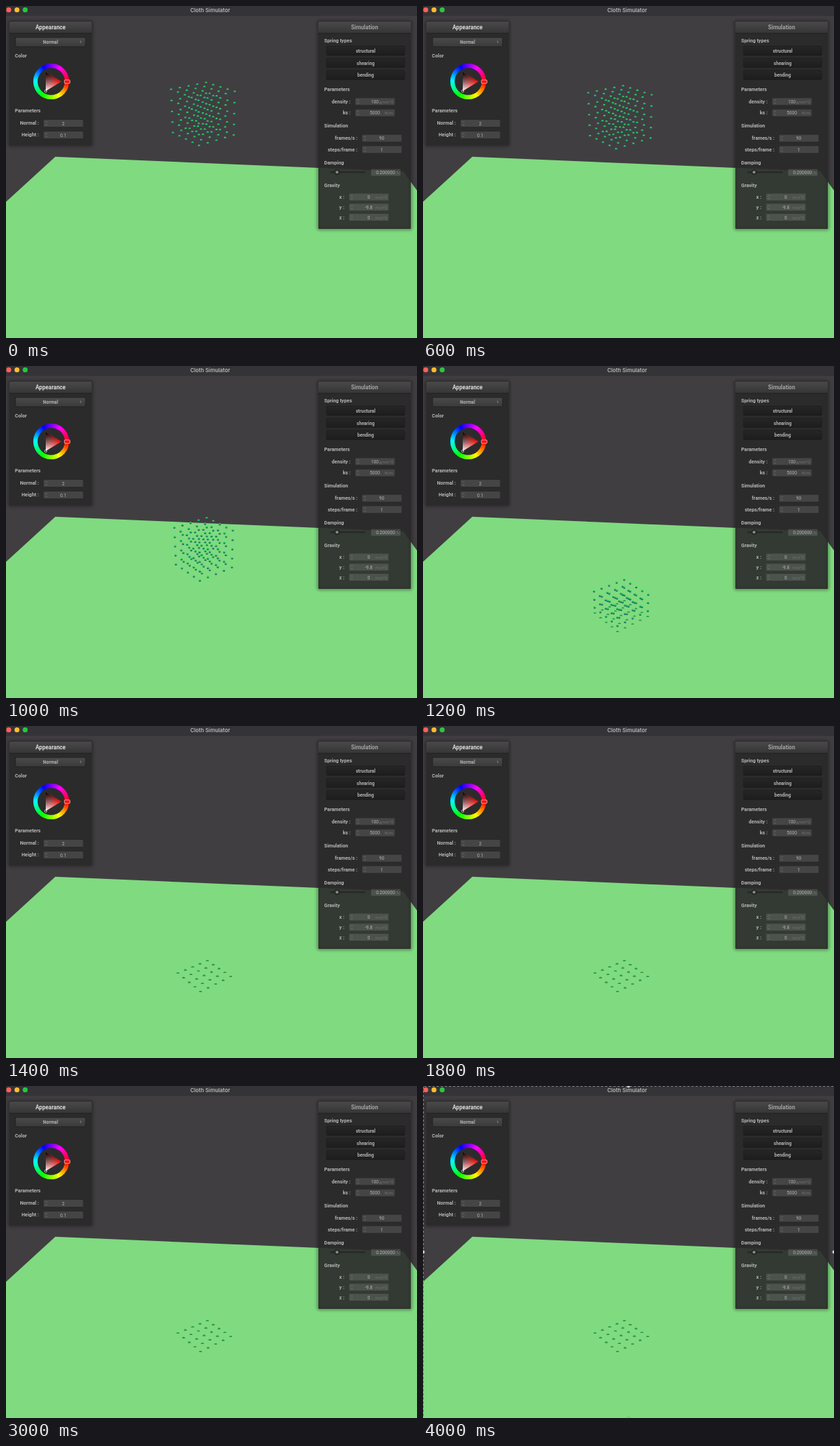
These frames come from a looping animation (600 by 484 pixels, 4800 ms). An HTML page:

```html
<!DOCTYPE html>
<html lang="en">
<head>
<meta charset="utf-8">
<title>Cloth Simulator</title>
<style>
html, body { margin: 0; width: 100%; height: 100%; overflow: hidden; background: #413e41; }
svg { display: block; width: 600px; height: 484px; }
text { font: 6.6px Roboto, sans-serif; fill: #b6b6b6; }
.bar { font: 600 7.8px Inter, sans-serif; fill: #b9b8b9; }
.title { font-size: 8.2px; font-weight: 700; }
.label { font-size: 7.2px; font-weight: 700; }
.button { font-weight: 700; }
.unit { font-size: 6.2px; fill: #737373; }
</style>
</head>
<body>
<svg id="stage" viewBox="0 0 600 484">
  <defs>
    <linearGradient id="header" x2="0" y2="1"><stop stop-color="#494949"/><stop offset="1" stop-color="#353535"/></linearGradient>
    <linearGradient id="raised" x2="0" y2="1"><stop stop-color="#4a4a4a"/><stop offset="1" stop-color="#3a3a3a"/></linearGradient>
    <linearGradient id="pushed" x2="0" y2="1"><stop stop-color="#262626"/><stop offset="1" stop-color="#1d1d1d"/></linearGradient>
    <linearGradient id="tint" gradientUnits="userSpaceOnUse" x1="81" y1="110" x2="58" y2="124"><stop stop-color="#f00"/><stop offset="1" stop-color="#fff"/></linearGradient>
    <linearGradient id="shade" gradientUnits="userSpaceOnUse" x1="70" y1="117" x2="58" y2="96"><stop stop-opacity="0"/><stop offset="1"/></linearGradient>
    <linearGradient id="normals" x2="0" y2="1"><stop offset=".25" stop-color="#30dc58"/><stop offset=".6" stop-color="#1f8a70"/><stop offset="1" stop-color="#1c3044"/></linearGradient>
    <linearGradient id="cap" x2="0" y2="1"><stop stop-color="#34bd54"/><stop offset="1" stop-color="#2a8a46"/></linearGradient>
    <filter id="soft" x="-20%" y="-20%" width="140%" height="140%"><feGaussianBlur stdDeviation="2.2"/></filter>
    <circle id="ball" r="1.75" fill="url(#normals)"/>
    <path id="dome" d="M-2 .8A2 1.7 0 0 1 2 .8Z" fill="url(#cap)"/>
  </defs>
  <path d="M0 285.5L72 219.8L580 241.3L600 269V484H0Z" fill="#80da80"/>
  <rect width="600" height="14.5" fill="#343337"/>
  <g id="cloth"></g>
  <g id="ui"></g>
  <g id="selection" fill="none">
    <path d="M0 484V0H600" stroke="#222"/>
    <path d="M0 484V0H600" stroke="#ddd" stroke-dasharray="3 3"/>
    <g fill="#ddd" stroke="#666" stroke-width=".6">
      <circle cx="300" cy="0" r="2.5"/><circle cx="0" cy="242" r="2.5"/>
      <circle cx="600" cy="242" r="2.5"/><circle cx="300" cy="485" r="2.5"/>
    </g>
  </g>
</svg>
<script>
const $ = id => document.getElementById(id);
const ui = $('ui');

function add(tag, attrs, parent = ui, content = '') {
  const node = document.createElementNS('http://www.w3.org/2000/svg', tag);
  for (const key in attrs) node.setAttribute(key, attrs[key]);
  node.textContent = content;
  return parent.appendChild(node);
}
const text = (x, y, content, cls = '', anchor = 'start') =>
  add('text', { x, y, class: cls, 'text-anchor': anchor }, ui, content);
const rect = (x, y, width, height, attrs) => add('rect', { x, y, width, height, ...attrs });
const path = (d, attrs) => add('path', { d, fill: 'none', ...attrs });
const disc = (cx, cy, r, attrs) => add('circle', { cx, cy, r, ...attrs });

function panel(x, y, w, h, title, color) {
  rect(x, y, w, h, { rx: 2, fill: 'none', stroke: '#000', 'stroke-width': 4, opacity: .36, filter: 'url(#soft)' });
  rect(x, y, w, h, { rx: 1.5, fill: '#2b2a2b', 'fill-opacity': .9 });
  rect(x, y, w, 17, { rx: 1.5, fill: 'url(#header)' });
  rect(x, y + 16.5, w, .8, { fill: '#1b1b1b' });
  text(x + w / 2, y + 11.2, title, 'title', 'middle').style.fill = color;
}

function button(x, y, w, label, fill) {
  rect(x, y, w, 13.4, { rx: 1.5, fill: `url(#${fill})`, stroke: '#1b1b1b', 'stroke-width': .7 });
  text(x + w / 2, y + 9.4, label, 'button', 'middle');
}

function field(x, y, label, value, unit = '') {
  if (label) text(x - 7, y + 7.4, label + ' :', 'label', 'end');
  rect(x, y, 57.5, 10, { rx: 1, fill: '#fff', 'fill-opacity': .12 });
  path(`M${x + 2.5} ${y + 4}l1.4 -1.6l1.4 1.6m0 2.4l-1.4 1.6l-1.4 -1.6`, { stroke: '#888', 'stroke-width': .5 });
  text(x + 28.5, y + 7.6, value, '', 'middle');
  text(x + 55.5, y + 7.4, unit, 'unit', 'end');
}

// Title bar
['#ff5f57', '#febc2e', '#28c840'].forEach((fill, i) => disc(4 + 12 * i, 5.7, 3.6, { fill }));
text(298, 8.6, 'Cloth Simulator', 'bar', 'middle');

// Appearance panel
panel(5, 23, 120, 180, 'Appearance', '#dcdcdc');
button(14, 46, 102, 'Normal', 'raised');
path('M108.2 50.8l1.6 1.5l-1.6 1.5', { stroke: '#aaa', 'stroke-width': .8 });
text(13, 75, 'Color', 'label');
for (let hue = 0; hue < 360; hue += 5)
  path('M89 109.8A23 23 0 0 1 88.8 112.5', {
    stroke: `hsl(${hue} 100% 50%)`, 'stroke-width': 6.2, transform: `rotate(${hue} 66 110)`
  });
for (const fill of ['tint', 'shade']) path('M81 110L58 124V96Z', { fill: `url(#${fill})` });
disc(58, 124, 1.7, { fill: 'none', stroke: '#ccc', 'stroke-width': .8 });
rect(85.3, 107.9, 8, 4.8, { rx: .8, fill: '#f00', stroke: '#fbb', 'stroke-width': .9 });
text(13, 155, 'Parameters', 'label');
field(55, 166, 'Normal', '2');
field(55, 183, 'Height', '0.1');

// Simulation panel
panel(456, 23, 135, 302, 'Simulation', '#a2a2a2');
[['Spring types', 53], ['Parameters', 124], ['Simulation', 177], ['Damping', 231], ['Gravity', 264]]
  .forEach(([name, y]) => text(464.5, y, name, 'label'));
['structural', 'shearing', 'bending'].forEach((name, i) => button(468, 58.5 + 17.7 * i, 114, name, 'pushed'));
field(510, 134.3, 'density', '100', 'g/cm^2');
field(510, 150.8, 'ks', '5000', 'N/m');
field(520, 187.7, 'frames/s', '90');
field(520, 204.3, 'steps/frame', '1');
rect(473, 241, 52, 2.6, { rx: 1.3, fill: '#1d211d', opacity: .6 });
disc(483.3, 242.2, 3.8, { fill: '#353635', stroke: '#1f1f1f', 'stroke-width': .7 });
disc(483.3, 242.2, 1.7, { fill: '#999' });
rect(533, 237.8, 43, 9.6, { rx: 1, fill: '#fff', 'fill-opacity': .12 });
text(554, 245, '0.200000', '', 'middle');
text(574.5, 245, '%', 'unit', 'end');
['0', '-9.8', '0'].forEach((g, i) => field(501, 273.5 + 14.8 * i, 'xyz'[i], g, 'm/s^2'));

// Corners of the top layer and of its landing place: back, right, left, front
const TOP = [[292, 112], [334, 125], [241, 122], [281, 138]];
const GROUND = [[294, 342], [328, 365], [251, 360], [284, 387]];
const N = 5, HEIGHT = 17.4, PERSPECTIVE = .205, GRAVITY = 30;

const mix = (a, b, k) => a + (b - a) * k;
const spot = (c, u, v) => [0, 1].map(d => mix(mix(c[0][d], c[1][d], u), mix(c[2][d], c[3][d], u), v));

const masses = [];
for (let layer = N - 1; layer >= 0; layer--)
  for (let i = 0; i < N; i++)
    for (let j = 0; j < N; j++) {
      const u = i / (N - 1), v = j / (N - 1);
      masses.push({ layer, from: spot(TOP, u, v), to: spot(GROUND, u, v), node: add('use', {}, $('cloth')) });
    }

function draw(ms) {
  const fall = GRAVITY * Math.max(0, ms / 1000 - .5) ** 2;
  for (const { layer, from, to, node } of masses) {
    const f = Math.min(1, (layer + fall) / HEIGHT);
    const k = f * (1 + PERSPECTIVE) / (1 + f * PERSPECTIVE);
    node.setAttribute('href', f < 1 ? '#ball' : '#dome');
    node.setAttribute('transform', `translate(${mix(from[0], to[0], k)} ${mix(from[1], to[1], k)})`);
  }
  $('selection').style.display = ms < 3700 ? 'none' : '';
}

const start = performance.now();
(function tick() {
  const ms = (performance.now() - start) % 4800;
  draw(Math.floor(ms / 100) * 100);
  requestAnimationFrame(tick);
})();
</script>
</body>
</html>
```
